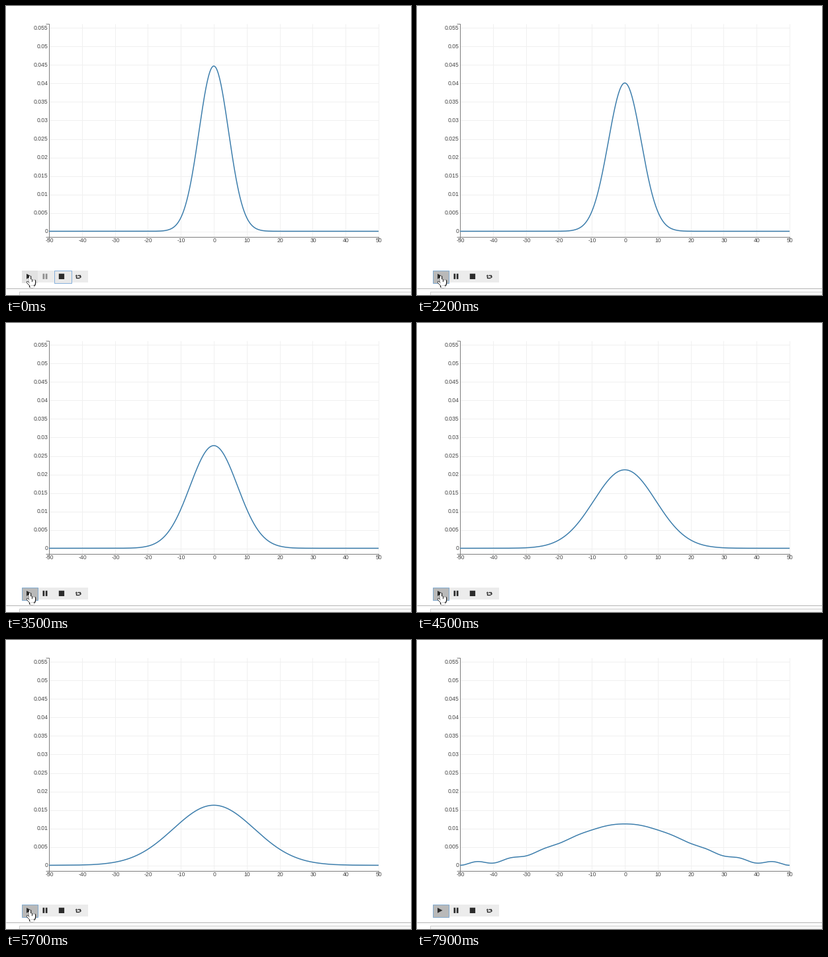
A matplotlib script that plays this animation: 612x438 px, repeating every 8000 ms.

```python
import numpy as np
import matplotlib.pyplot as plt
from matplotlib.animation import FuncAnimation
from matplotlib.patches import Polygon, Rectangle

W, H, DPI = 612, 438, 100
FRAMES, STEP = 80, 100
PX = 72 / DPI
LEFT, RIGHT, TOP, BOTTOM = 64.5, 562.5, 26.5, 349.5
ZERO_Y, Y_SCALE = 341.4, 5614
INK, AXIS, GRID = "#2b2b2b", "#7d7d7d", "#f0f0f0"
PRESS, START, RATE = 1.1, 1.37, 0.592  # seconds, seconds, spread per second
LEAVE = 7.6

fig = plt.figure(figsize=(W / DPI, H / DPI), dpi=DPI, facecolor="white")
ax = fig.add_axes([0, 0, 1, 1])
ax.set(xlim=(0, W), ylim=(H, 0))
ax.axis("off")


def to_x(value):
    return LEFT + 0.5 + (value + 50) * (RIGHT - LEFT) / 100


def to_y(value):
    return ZERO_Y - value * Y_SCALE


def line(xs, ys, color, width=1, cap="butt", **kw):
    return ax.plot(xs, ys, color=color, lw=width * PX,
                   solid_capstyle=cap, **kw)[0]


def box(x, y, w, h, fill, edge="none", z=2):
    return ax.add_patch(Rectangle((x, y), w, h, fc=fill, ec=edge, lw=PX, zorder=z))


def triangle(points):
    ax.add_patch(Polygon(points, fc=INK, ec="none", zorder=4))


def label(x, y, text, align):
    ax.text(x, y, text, ha=align, va="baseline", color="#484848",
            family="Liberation Sans", size=8.6 * PX, zorder=3)


# Grid, tick labels and axes
for v in range(-50, 51, 10):
    x = round(to_x(v)) - 0.5
    line([x, x], [TOP, BOTTOM], GRID, zorder=0)
    label(to_x(v) + 0.8, 358.4, str(v), "center")
for k in range(12):
    y = np.floor(to_y(k * 0.005)) + 0.5
    line([LEFT, RIGHT], [y, y], GRID, zorder=0)
    label(63.4, to_y(k * 0.005) + 3.1, f"{k * 0.005:g}", "right")
line([60, LEFT, LEFT, 60], [TOP, TOP, BOTTOM, BOTTOM], AXIS, zorder=1)
line([LEFT, LEFT, RIGHT, RIGHT], [356, BOTTOM, BOTTOM, 356], AXIS, zorder=1)

# Page elements below the chart
line([0, W], [427.5, 427.5], "#b4b4b4", zorder=1)
box(19.5, 432.5, W, 20, "#f6f6f6", "#cfcfcf")

# Player buttons
box(24, 401, 100, 18, "#ececec")
play = box(23.5, 400.5, 24, 19, "#e2e2e2")
stop = box(72.5, 400.5, 26, 19, "#e9e9e9", "#86b0dc", z=3)
triangle([(31, 405.8), (31, 413.8), (38.5, 409.8)])
bars = [box(x, 405.7, 2.7, 8.2, INK, z=4) for x in (55.5, 59.8)]
square = box(79.8, 405.7, 8.3, 8.3, INK, z=4)
for part in (*bars, square):
    part.set_snap(False)
for sign in (1, -1):
    head = np.array([(-4.8, -0.3), (-3, -2.7), (-1.2, -0.3)])
    stem = np.array([(-3, -0.5), (-3, 2.3), (1.6, 2.3)])
    triangle(head * sign + (109.4, 409.8))
    line(*(stem * sign + (109.4, 409.8)).T, INK, 1.4, zorder=4)


def hand_strokes():
    """Thick round strokes (x pair, y pair, width) that form a pointing hand."""
    yield (36, 36), (409.5, 419), 2
    for k in range(1, 4):
        x = 36 + 2.3 * k
        yield (x, x), (414.6 + 0.6 * k, 420), 2
    yield (32.5, 37), (418.6, 423.5), 2
    yield (38, 41.2), (421, 421), 5.6
    yield (37.2, 41.4), (424.6, 424.6), 3


hand = [(line(xs, ys, color, width + rim, "round", zorder=z), np.array(ys))
        for color, rim, z in (("#1c1c1c", 1.4, 6), ("white", 0, 7))
        for xs, ys, width in hand_strokes()]

xs = np.linspace(-50, 50, 501)
curve = line(to_x(xs), xs * 0, "#3a7cab", 1.5, zorder=5)


def density(s, variance=20):
    """Free wave packet between hard walls at +-50, by mirror images."""
    q = 1 + 1j * s
    psi = sum((-1) ** n * np.exp(-(xs - 100 * n) ** 2 / (4 * variance * q))
              for n in range(-2, 3))
    return 0.5 * np.abs(psi / np.sqrt(q)) ** 2 / np.sqrt(2 * np.pi * variance)


def update(i):
    t = i * STEP / 1000
    curve.set_ydata(to_y(density(RATE * max(0, t - START))))

    playing = t >= PRESS
    play.set_facecolor("#b9b9b9" if playing else "#e2e2e2")
    play.set_edgecolor("#82abd0" if playing else "none")
    stop.set_visible(not playing)
    for bar in bars:
        bar.set_facecolor(INK if playing else "#8f8f8f")

    drop = 120 * max(0, t - LEAVE)
    for stroke, ys in hand:
        stroke.set_ydata(ys + drop)
        stroke.set_visible(drop < 20)
    return [curve]


anim = FuncAnimation(fig, update, frames=FRAMES, interval=STEP,
                     repeat=True, repeat_delay=0, blit=False)
plt.show()
```
